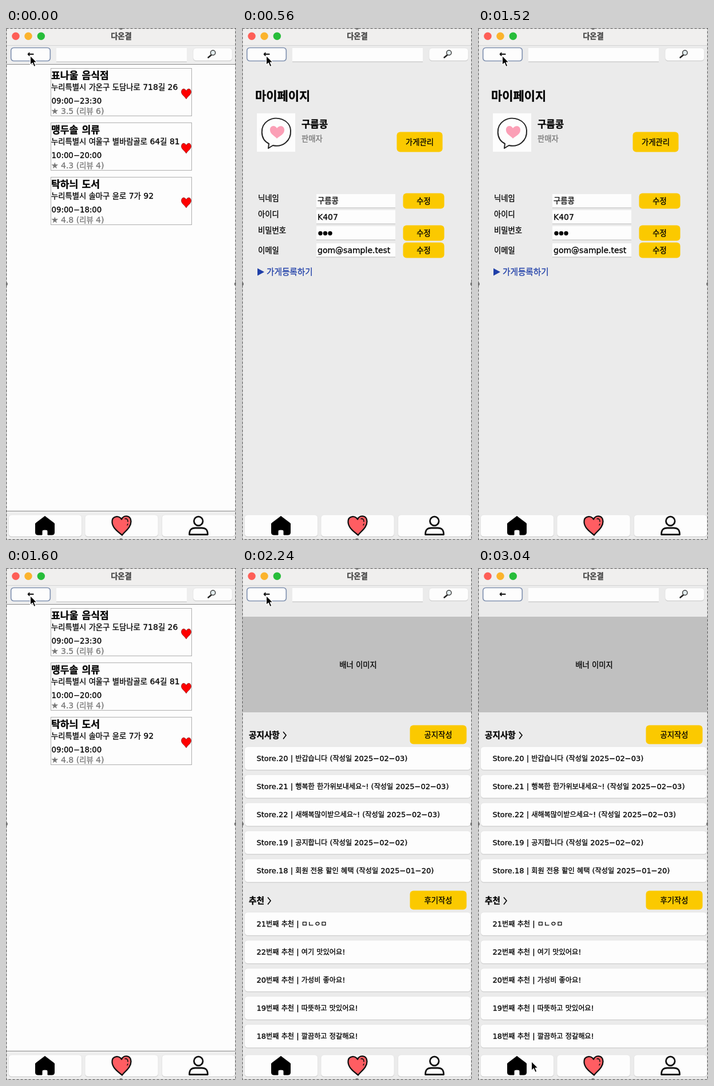
Animation, 402 px wide and 894 px high, one loop 3.2 s. Source, as an HTML page:

```html
<!DOCTYPE html>
<html lang="ko">
<head>
<meta charset="utf-8">
<style>
html, body { margin: 0; width: 100%; height: 100%; overflow: hidden; background: #ebebeb; }
svg { display: block; }
text { font-family: "DejaVu Sans", "Noto Sans CJK KR", sans-serif; white-space: pre; stroke-width: .3; }
tspan { font-family: "Noto Sans CJK KR", "Noto Sans CJK", "Noto Sans CJK JP", sans-serif; }
</style>
</head>
<body>
<svg id="stage" width="402" height="894" viewBox="0 0 402 894"></svg>
<script>
const LOOP = 3200;
const YELLOW = '#fbc900';

const rect = (x, y, w, h, fill, more = '') =>
  `<rect x="${x}" y="${y}" width="${w}" height="${h}" fill="${fill}" ${more}/>`;
const path = (d, more = '') => `<path d="${d}" ${more}/>`;
const circle = (x, y, r, fill, more = '') =>
  `<circle cx="${x}" cy="${y}" r="${r}" fill="${fill}" ${more}/>`;

// Hangul runs get their own face and size within a line.
function text(x, y, s, { size = 14, ko = size * .95, fill = '#000', bold, mid } = {}) {
  const runs = s.replace(/[ㄱ-ㅣ가-힣~]+/g, m => `<tspan font-size="${ko}">${m}</tspan>`);
  return `<text x="${x}" y="${y}" font-size="${size}" fill="${fill}" stroke="${fill}"` +
    (bold ? ' font-weight="700"' : '') + (mid ? ' text-anchor="middle"' : '') + `>${runs}</text>`;
}

const panel = (x, y, w, h) =>
  rect(x, y + 1, w, h, '#c4c4c4', 'rx="5.5"') + rect(x, y, w, h, '#fdfdfd', 'rx="5.5" stroke="#dedede" stroke-width=".6"');
const field = (y, x = 130, w = 138) =>
  rect(x, y, w, 24, '#fdfdfd') + rect(x, y + 23.5, w, 1, '#b9b9b9');
const button = (x, y, w, h, label) =>
  rect(x - .5, y - .5, w + 1, h + 1, YELLOW, 'rx="6"') + text(x + w / 2, y + h / 2 + 5, label, { mid: true });

function header() {
  return rect(0, 0, 402, 30, '#f0efee') + rect(0, 30, 402, 1, '#d3d3d3') +
    circle(17, 14.2, 6.7, '#fe5f57') + circle(39, 14.2, 6.7, '#fbb32d') + circle(61.3, 14.2, 6.7, '#27bd3a') +
    text(201.5, 18.5, '다온결', { bold: true, fill: '#444', mid: true }) +
    rect(8.7, 34.5, 68.6, 23, '#fdfdfd', 'rx="5" stroke="#8293b1" stroke-width="1.7"') +
    text(43, 49.5, '←', { bold: true, mid: true }) +
    field(35, 88, 228) + panel(327, 35, 68.5, 22) +
    path('M359 47L353.5 51.5', 'stroke="#222" stroke-width="2.6" stroke-linecap="round"') +
    circle(361.7, 43.2, 4.2, '#e3edf0', 'stroke="#444" stroke-width="1.5"');
}

function nav() {
  return [4.5, 138, 272.5].map(x => panel(x, 850, 128, 38)).join('') +
    path('M68 852.500L84.500 865V881Q84.500 885 81 885H73V879Q73 876 68 876Q63 876 63 879V885H55Q51.500 885 51.500 881V865Z',
      'stroke="#000" stroke-linejoin="round"') +
    path('M202 858C198 851 185 851 185.500 863C186 873 196 880 203 885.500C207 879 218.500 873 218.500 861.500C218 850 205 850 202 858Z',
      'fill="#ff5d62" stroke="#111" stroke-width="2.3" stroke-linejoin="round"') +
    path('M208 857Q213 856 213 862M213 866L212 868', 'fill="none" stroke="#111" stroke-width="1.6" stroke-linecap="round"') +
    circle(336.3, 861, 7.8, 'none', 'stroke="#111" stroke-width="2.8"') +
    path('M320.500 884.500C320.500 876 324 873 331 873H342C349 873 352.500 876 352.500 884.500Z',
      'fill="none" stroke="#111" stroke-width="2.8" stroke-linejoin="round"');
}

function card([name, place, hours, rating], i) {
  return `<g transform="translate(0 ${95 * i})">` +
    rect(78.5, 70.500, 246, 83, '#fdfdfd', 'stroke="#aeaeae"') +
    text(79, 89, name, { size: 18, bold: true }) +
    text(79, 108, place) +
    text(79.5, 132, hours, { size: 13.3 }) +
    text(79, 150, rating, { fill: '#777' }) +
    path('M315 110C313 104.500 306.500 105 306.500 112C307 117 312 119 315 124C318 119 323 117 323.500 112C323.500 105 317 104.500 315 110Z',
      'fill="#fe0000" stroke="#611" stroke-width=".6"') + '</g>';
}

function likes() {
  return rect(0, 31, 402, 32, '#eee') + rect(0, 63, 402, 781, '#fdfdfd') +
    rect(0, 63, 402, 1, '#888') + rect(0, 843, 402, 1, '#888') + rect(0, 844, 402, 50, '#eee') +
    [
      ['표나울 음식점', '누리특별시 가온구 도담나로 718길 26', '09:00−23:30', '★ 3.5 (리뷰 6)'],
      ['맹두솔 의류', '누리특별시 여울구 별바람골로 64길 81', '10:00−20:00', '★ 4.3 (리뷰 4)'],
      ['탁하늬 도서', '누리특별시 솔마구 윤로 7가 92', '09:00−18:00', '★ 4.8 (리뷰 4)']
    ].map(card).join('');
}

function myPage() {
  const labels = [['닉네임', 302], ['아이디', 330], ['비밀번호', 358], ['이메일', 393]];
  return text(23, 126, '마이페이지', { size: 22, bold: true }) +
    rect(26, 149, 67, 67, '#fdfdfd') +
    path('M47 202C31 194 31 171 45 162C60 152 84 160 85 179C86 197 71 209 54 205L46 210Z',
      'fill="none" stroke="#222" stroke-width="2" stroke-linejoin="round"') +
    path('M61 175C57 168 48 171 49 179C50 186 57 188 61 193C66 188 74 186 74 178C74 170 65 169 61 175Z', 'fill="#fb9fb6"') +
    text(104, 174, '구름콩', { size: 17.6, bold: true }) +
    text(104, 198, '판매자', { fill: '#777' }) +
    button(271, 182, 79, 34, '가게관리') +
    labels.map(([s, y]) => text(28, y, s)).join('') +
    [290, 318, 346, 376].map(y => field(y)).join('') +
    text(132, 306, '구름콩') + text(132, 335, 'K407') + text(132, 393, 'gom@sample.test') +
    [137, 145.5, 154].map(x => circle(x, 358.500, 3.7, '#000')).join('') +
    [289, 345, 375].map(y => button(282, y, 71, 26, '수정')).join('') +
    path('M27 419.500L39 426L27 432.500Z', 'fill="#1f3fa8"') +
    text(43, 431, '가게등록하기', { size: 15.4, fill: '#1f3fa8' });
}

function section(y, title, action, arrowX, rows) {
  return text(12, y + 22, title, { size: 15.4, bold: true }) +
    path(`M${arrowX} ${y + 11}l5 6l-5 6.500`, 'fill="none" stroke="#000" stroke-width="1.6"') +
    button(294, y, 98, 32, action) +
    rows.map((s, i) => panel(4.5, y + 37 + 49 * i, 395.500, 40.5) +
      text(25.5, y + 62 + 49 * i, s, { size: 13, ko: 12.2 })).join('');
}

function home() {
  return rect(0, 85, 402, 167, '#c0c0c0') + text(203, 174, '배너 이미지', { mid: true }) +
    section(275, '공지사항', '공지작성', 72, [
      'Store.20 | 반갑습니다 (작성일 2025−02−03)',
      'Store.21 | 행복한 한가위보내세요~! (작성일 2025−02−03)',
      'Store.22 | 새해복많이받으세요~! (작성일 2025−02−03)',
      'Store.19 | 공지합니다 (작성일 2025−02−02)',
      'Store.18 | 회원 전용 할인 혜택 (작성일 2025−01−20)']) +
    section(564, '추천', '후기작성', 45, [
      '21번째 추천 | ㅁㄴㅇㅁ',
      '22번째 추천 | 여기 맛있어요!',
      '20번째 추천 | 가성비 좋아요!',
      '19번째 추천 | 따뜻하고 맛있어요!',
      '18번째 추천 | 깔끔하고 정갈해요!']);
}

function frame() {
  return rect(.5, .5, 401, 893, 'none', 'stroke="#c9c9c9" stroke-width="1.5"') +
    rect(.5, .5, 401, 893, 'none', 'stroke="#666" stroke-width="1.5" stroke-dasharray="4 3"') +
    [[201, 0], [201, 894], [0, 447], [402, 447]].map(([x, y]) => circle(x, y, 3, '#777')).join('');
}

const pages = { likes, myPage, home };
document.getElementById('stage').innerHTML = rect(0, 0, 402, 894, '#ebebeb') +
  Object.entries(pages).map(([id, draw]) => `<g id="${id}">${draw()}</g>`).join('') +
  header() + nav() + frame() +
  path('M0 0V16L3.800 12.500L6.500 19L9.300 17.800L6.600 11.500H11.500Z',
    'id="cursor" stroke="#fff" stroke-width="1.1" stroke-linejoin="round"');

const groups = Object.keys(pages).map(id => document.getElementById(id));
const cursor = document.getElementById('cursor');

const pageAt = t => t < 560 ? 'likes' : t < 1600 ? 'myPage' : t < 2240 ? 'likes' : 'home';

function cursorAt(t) {
  const u = Math.min(1, Math.max(0, (t - 2400) / 560));
  const k = u * u * (3 - 2 * u);
  return [42.5 + 51 * k + 200 * k * (1 - k), 48.5 + 813 * k];
}

function tick() {
  const t = performance.now() % LOOP;
  const page = pageAt(t);
  for (const g of groups) g.style.display = g.id === page ? '' : 'none';
  cursor.setAttribute('transform', `translate(${cursorAt(t)})`);
  requestAnimationFrame(tick);
}
tick();
</script>
</body>
</html>
```
